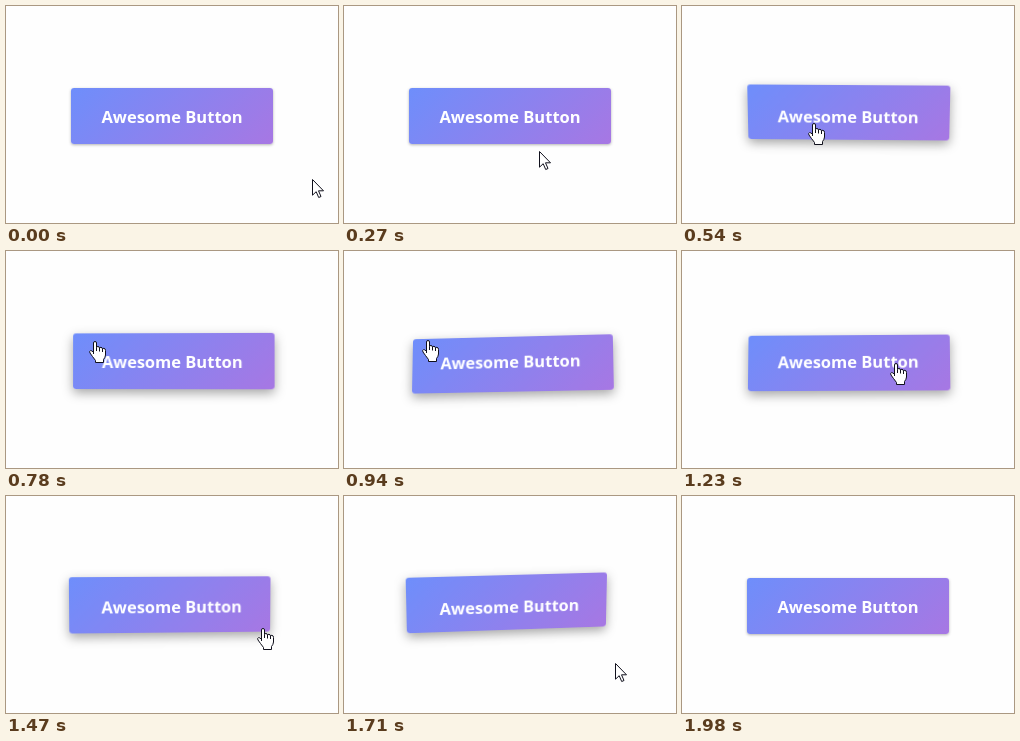
Recreate the animation shown at these times as an HTML page. Size 332 by 217 pixels, loop 2350 ms.

```html
<!DOCTYPE html>
<html lang="en">
<head>
<meta charset="utf-8">
<title>Tilting button</title>
<style>
html, body { margin: 0; width: 100%; height: 100%; overflow: hidden; background: #fefefe; }
#scene { position: absolute; left: 65px; top: 82px; width: 202px; height: 56px; perspective: 1000px; }
#button, #face, #label { position: absolute; inset: 0; }
#button { transform-style: preserve-3d; }
#face {
  border-radius: 3px;
  background: linear-gradient(135deg, #6e8efb, #a777e3);
  transform: translateZ(-16px) scale(1.016);
}
#label {
  display: flex; align-items: center; justify-content: center;
  padding-top: 1px; white-space: nowrap;
  color: #fff; font: 700 16.5px "Open Sans", "Noto Sans", sans-serif;
}
svg { position: absolute; left: 0; top: 0; }
path { fill: #fff; stroke: #10101c; stroke-linejoin: round; }
</style>
</head>
<body>
<div id="scene">
  <div id="button"><div id="face"></div><div id="label">Awesome Button</div></div>
</div>
<svg width="332" height="217" viewBox="0 0 332 217">
  <g id="arrow"><path d="M.5 .5V16.2L4.2 12.7 6.7 18.5 9 17.5 6.5 11.8H11.5Z"/></g>
  <g id="hand">
    <path d="M4.5 13V2Q4.5 .5 6 .5T7.5 2V6.5Q7.7 5.5 9 5.5T10.5 7Q10.8 6.3 12 6.3T13.5 8Q13.8 7.3 14.9 7.3 16.5 7.5 16.5 9.5V14Q16.3 16.5 14.5 18.5V21.5H6.5V19.5Q5 17.5 3.5 15.5L1 12Q0 10.3 1.5 9.6 2.8 9.3 4.5 11.5Z"/>
    <path d="M7.5 6.5V10M10.5 7V10.5M13.5 8V11" style="fill:none"/>
  </g>
</svg>
<script>
const LOOP = 2350, LAG = 170, CX = 166, CY = 110;
const $ = id => document.getElementById(id);
const button = $("button"), face = $("face"), arrow = $("arrow"), hand = $("hand");

// The picture holds still between these moments.
const ticks = [0, 120, 270, 390, 540, 660, 780, 940, 1080, 1230, 1350, 1470, 1590, 1710, 1830, 1980];

// Turning points of the pointer: time, x, y
const trail = [
  [0, 306, 173], [120, 271, 167], [390, 135, 128], [540, 131, 117], [780, 88, 90],
  [940, 83, 89], [1230, 213, 112], [1470, 256, 132], [1710, 273, 159]
];

const clamp = (v, lo, hi) => Math.min(hi, Math.max(lo, v));
const ramp = (t, from, to) => clamp((t - from) / (to - from), 0, 1);

function pointer(t) {
  const i = clamp(trail.findIndex(p => p[0] > t), 1, trail.length - 1);
  const [t0, x0, y0] = trail[t > trail.at(-1)[0] ? trail.length - 2 : i - 1];
  const [t1, x1, y1] = trail[t > trail.at(-1)[0] ? trail.length - 1 : i];
  const k = ramp(t, t0, t1);
  return [x0 + (x1 - x0) * k, y0 + (y1 - y0) * k];
}

function place(node, x, y, shown) {
  node.setAttribute("transform", `translate(${Math.round(x)} ${Math.round(y)})`);
  node.style.display = shown ? "" : "none";
}

function draw(time) {
  const t = ticks.filter(v => v <= time).pop();
  const hover = ramp(t, 330, 540) * (1 - ramp(t, 1710, 1980));

  // The button leans towards where the pointer was a moment ago.
  const [px, py] = pointer(t - LAG);
  const rx = hover * clamp((CY - py) * 0.0105, -0.22, 0.22);
  const ry = hover * clamp((px - CX) * 0.0015, -0.15, 0.15);
  button.style.transform = `rotateX(${rx}rad) rotateY(${ry}rad)`;
  face.style.boxShadow =
    `0 ${1 + 3 * hover}px ${3 + 8 * hover}px rgba(0,0,0,${0.3 + 0.05 * hover})`;

  const [x, y] = pointer(t);
  const over = t >= 390 && t < 1590;
  place(arrow, x, y, !over && t < 1830);
  place(hand, x - 5, y, over);
}

let start;
function tick(now) {
  start ??= now;
  draw((now - start) % LOOP);
  requestAnimationFrame(tick);
}
draw(0);
requestAnimationFrame(tick);
</script>
</body>
</html>
```
